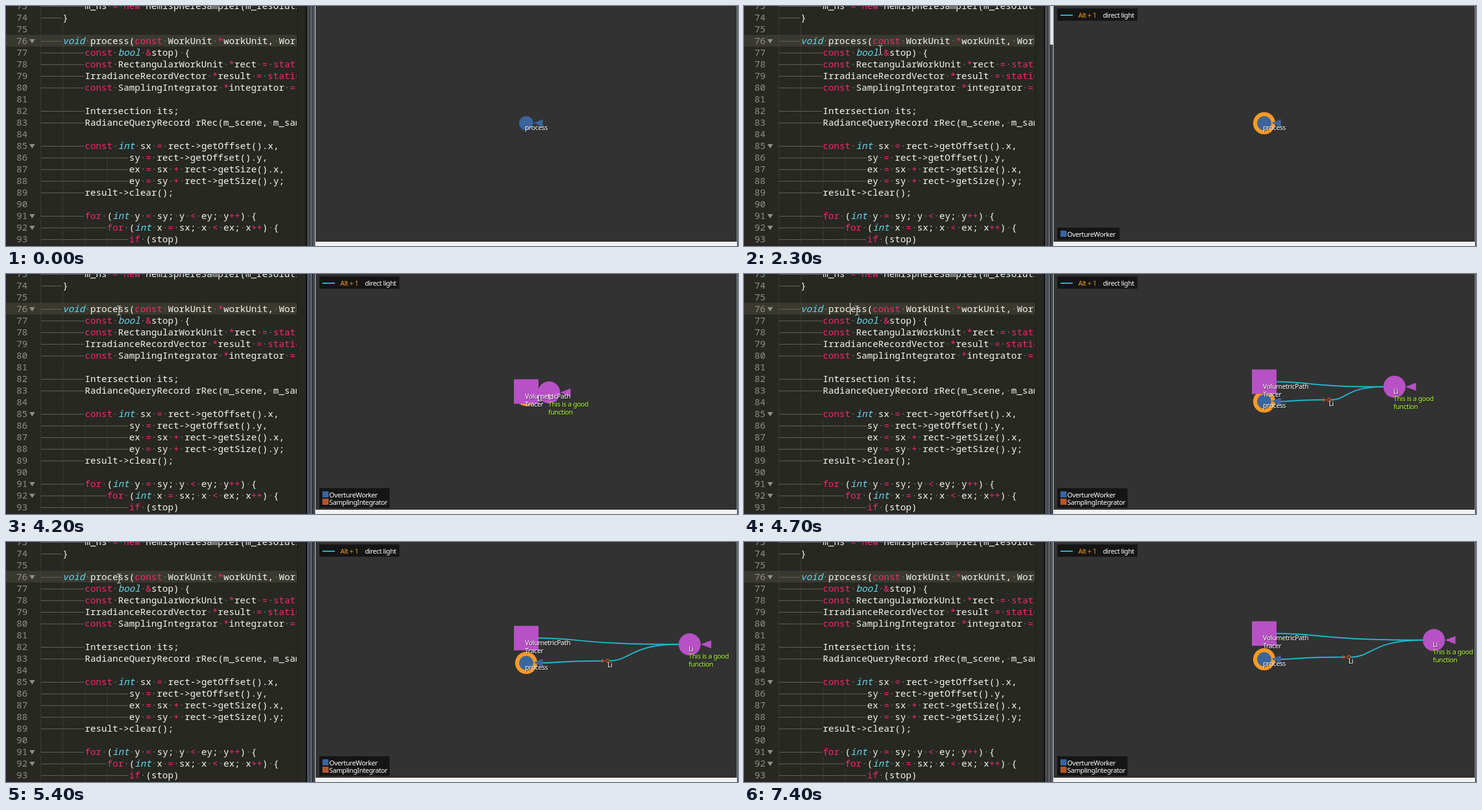
An HTML page that plays this animation: 1189 by 391 pixels, repeating every 7.5 s.

```html
<!DOCTYPE html>
<html lang="en">
<head>
<meta charset="utf-8">
<title>Call graph explorer</title>
<style>
html, body { margin: 0; width: 100%; height: 100%; overflow: hidden; background: #272822; }
svg { display: block; }
.code { font: 15px "Noto Sans Mono", "DejaVu Sans Mono", monospace; fill: #f8f8f2; }
.key { fill: #f92672; }
.type { fill: #66d9ef; font-style: italic; }
.dot { fill: #75715e; }
.num, .fold { fill: #8f908a; }
.tab { stroke: #62635c; }
.guide { stroke: #4c4d46; stroke-dasharray: 1 1; }
.ui { font: 11px "Noto Sans", "Open Sans", sans-serif; letter-spacing: -.4px; fill: #fff; }
.tags text { filter: drop-shadow(1px 1px 0 rgba(0, 0, 0, .6)); }
.note { fill: #adff2f; }
.box { fill: #151515; }
.blue { fill: #3a659d; }
.rust { fill: #b5562a; }
.purple { fill: #b751c5; }
.edge { fill: none; stroke: #1fb9d0; stroke-width: 2; }
</style>
</head>
<body>
<svg width="1189" height="391" viewBox="0 0 1189 391">
  <defs><clipPath id="page"><rect width="472" height="391"/></clipPath></defs>

  <rect width="488" height="391" fill="#272822"/>
  <rect y="47" width="472" height="19" fill="#3a392f"/>
  <g id="code" class="code" clip-path="url(#page)"></g>
  <path d="M473.5 0V391" stroke="#1c1d19"/>
  <rect id="caret" x="172" y="47" width="1" height="19" fill="#f8f8f0"/>

  <rect x="487" width="16" height="391" fill="#0c0d0e"/>
  <rect id="frameL" x="489" width="5" height="391"/>
  <rect x="495" width="1" height="391" fill="#d4d8dd"/>
  <rect id="frameR" x="497" width="5" height="391"/>
  <rect id="glow" x="497" width="5" height="63" fill="#dfe2e6"/>
  <rect x="502" width="1" height="391" fill="#c9cdd2"/>

  <rect x="503" width="684" height="391" fill="#323232"/>
  <rect x="503" y="384" width="684" height="7" fill="#f2f2f2"/>
  <rect x="1187" width="1" height="391" fill="#a4a8ad"/>
  <rect x="1188" width="1" height="391" fill="#33383e"/>

  <g id="links">
    <path id="e1" class="edge"/><path id="e2" class="edge"/><path id="e3" class="edge"/>
    <g id="call">
      <path d="M-10-3L-4 0L-10 3Z" class="rust"/>
      <circle r="2.5" fill="#323232" stroke="#b5562a" stroke-width="1.5"/>
    </g>
  </g>
  <g id="proc">
    <circle id="ring" r="18" fill="#ff9a24"/>
    <circle r="11.5" class="blue"/>
    <path d="M12-.5L27-6.5V6Z" class="blue"/>
  </g>
  <g class="ui tags"><text id="procTag">process</text></g>
  <g id="extra">
    <rect id="tracer" x="-20" y="-20" width="40" height="40" class="purple"/>
    <g id="li" class="purple"><circle r="18"/><path d="M18 0L35-6.5V6.5Z"/></g>
    <g class="ui tags">
      <g id="tracerTag"><text>VolumetricPath</text><text y="13">Tracer</text></g>
      <text id="callTag">Li</text>
      <g id="liTag"><text>Li</text>
        <text y="12" class="note">This is a good</text><text y="25" class="note">function</text></g>
    </g>
  </g>

  <g id="legend" class="ui">
    <rect x="509" y="4" width="130" height="20" class="box"/>
    <path d="M514 15H534" class="edge"/>
    <text x="543" y="19" fill="#f59a2c">Alt + 1</text>
    <text x="583" y="19">direct light</text>
    <rect id="keyBox" x="509" height="20" class="box"/>
    <g id="key1"><rect x="514" y="366" width="10" height="10" class="blue"/><text x="525" y="376">OvertureWorker</text></g>
    <g id="key2"><rect x="514" y="366" width="10" height="10" class="rust"/><text x="525" y="376">SamplingIntegrator</text></g>
  </g>

  <path id="beam" d="M-3-7.5H-1L0-6.5L1-7.5H3M0-6.5V6.5M-3 7.5H-1L0 6.5L1 7.5H3" fill="none" stroke="#f4f4f4"/>
  <path id="arrow" d="M0 0V16L3.8 12.5L6.3 18.3L8.8 17.2L6.3 11.7H11.4Z" fill="#fff" stroke="#000" stroke-width=".8"/>
</svg>
<script>
const $ = id => document.getElementById(id);
const LOOP = 7500, STEP = 100;

// Each line: tab count, then the text
const lines = [
  [2, 'm_ns = new HemisphereSampler(m_resolution'],
  [1, '}'],
  [0, ''],
  [1, 'void process(const WorkUnit *workUnit, WorkResult'],
  [2, 'const bool &stop) {'],
  [2, 'const RectangularWorkUnit *rect = static_cast'],
  [2, 'IrradianceRecordVector *result = static_cast'],
  [2, 'const SamplingIntegrator *integrator = '],
  [0, ''],
  [2, 'Intersection its;'],
  [2, 'RadianceQueryRecord rRec(m_scene, m_sampler'],
  [0, ''],
  [2, 'const int sx = rect->getOffset().x,'],
  [4, 'sy = rect->getOffset().y,'],
  [4, 'ex = sx + rect->getSize().x,'],
  [4, 'ey = sy + rect->getSize().y;'],
  [2, 'result->clear();'],
  [0, ''],
  [2, 'for (int y = sy; y < ey; y++) {'],
  [3, 'for (int x = sx; x < ex; x++) {'],
  [4, 'if (stop)']
];
const folds = [76, 85, 91, 92];
const esc = s => s.replace(/&/g, '&amp;').replace(/</g, '&lt;');
const span = (cls, s) => `<tspan class="${cls}">${esc(s)}</tspan>`;

function paint(src) {
  const token = /(\b(?:const|new|for|if|static_cast)\b|[*&=+<]+)|\b(void|bool|int)\b|( )|([^\s*&=+<\w]+|\w+)/g;
  return src.replace(token, (m, key, type, space) =>
    key ? span('key', m) : type ? span('type', m) : space ? span('dot', '·') : esc(m));
}

$('code').innerHTML = lines.map(([tabs, src], i) => {
  const n = 73 + i, y = 5 + 19 * i, x = 56 + 36 * tabs;
  let out = `<text x="17" y="${y}" class="num">${n}</text>`;
  for (let g = 0; g < Math.max(tabs, n > 74 ? 2 : 1); g++)
    out += `<path class="guide" d="M${56.5 + 36 * g} ${y - 15}v19"/>`;
  if (tabs) out += `<path class="tab" d="M57 ${y - 4.5}H${x - 1}"/>`;
  if (folds.includes(n)) out += `<path class="fold" d="M38 ${y - 8}h9l-4.5 7z"/>`;
  return out + `<text x="${x}" y="${y}">${paint(src)}</text>`;
}).join('');

// Pointer route: time, x, y
const route = [
  [100, 1200, 28], [300, 1177, 31], [800, 856, 201], [900, 862, 198], [1000, 862, 190],
  [1700, 862, 190], [2300, 221.5, 72], [2500, 173.5, 63], [2800, 173.5, 63],
  [3200, 183.5, 59.5], [6400, 183.5, 59.5], [7000, 1205, 80]
];
function pointer(t) {
  const i = route.findIndex(k => k[0] > t);
  if (i < 1) return route[i ? route.length - 1 : 0].slice(1);
  const [t0, x0, y0] = route[i - 1], [t1, x1, y1] = route[i];
  const p = (t - t0) / (t1 - t0);
  return [x0 + (x1 - x0) * p, y0 + (y1 - y0) * p];
}

const show = (id, on) => $(id).style.display = on ? '' : 'none';
const move = (id, x, y) => $(id).setAttribute('transform', `translate(${x} ${y})`);
const tag = (id, x, y) => move(id, Math.round(x), Math.round(y));
// Both control points sit 30% along, so the bend comes early
const curve = (id, x0, y0, x1, y1) => {
  const m = x0 + (x1 - x0) * .3;
  $(id).setAttribute('d', `M${x0} ${y0}C${m} ${y0} ${m} ${y1} ${x1} ${y1}`);
};

function draw(t) {
  // Nodes spread out and settle exponentially
  const tau = Math.max(0, (t - 4145) / 1000);
  const rest = Math.exp(-2.63 * tau), grow = 1 - rest;
  const px = 845, py = 191 + 130 * tau * rest;
  const sy = py - 42 * grow;
  const lx = px + 275.6 * grow, ly = py - 31.3 * grow;
  const cx = px + 137.6 * grow, cy = py - 3.5 * grow;
  const open = t >= 4000;

  move('proc', px, py);
  move('tracer', px, sy);
  move('li', lx, ly);
  move('call', cx, cy);
  curve('e1', px + 20, sy, lx - 18, ly);
  curve('e2', px + 25, py, cx - 9, cy);
  curve('e3', cx + 3, cy, lx - 18, ly);
  tag('procTag', px - 2, py + 10.5);
  tag('tracerTag', px - 2, sy + 11);
  tag('callTag', cx - 1, cy + 10);
  tag('liTag', lx - 1.4, ly + 11);
  for (const id of ['links', 'extra', 'key2']) show(id, open);

  show('ring', t >= 800);
  show('legend', t >= 1000);
  $('keyBox').setAttribute('y', open ? 349 : 361);
  $('keyBox').setAttribute('height', open ? 32 : 20);
  $('keyBox').setAttribute('width', open ? 114 : 101);
  move('key1', 0, open ? -12 : 0);

  const idle = t < 1000 || t >= 7300, right = t >= 1000 && t < 2600;
  $('frameL').setAttribute('fill', idle || right ? '#484b4f' : '#4b5561');
  $('frameR').setAttribute('fill', idle ? '#50555c' : '#3b424a');
  show('glow', right);

  show('caret', t >= 2600 && t < 7100 && (t - 2600) % 1000 < 500);
  const [mx, my] = pointer(t), inCode = mx < 472;
  show('beam', inCode);
  show('arrow', !inCode);
  move(inCode ? 'beam' : 'arrow', mx, my);
}

function tick() {
  draw(Math.floor(performance.now() % LOOP / STEP) * STEP);
  requestAnimationFrame(tick);
}
tick();
</script>
</body>
</html>
```
